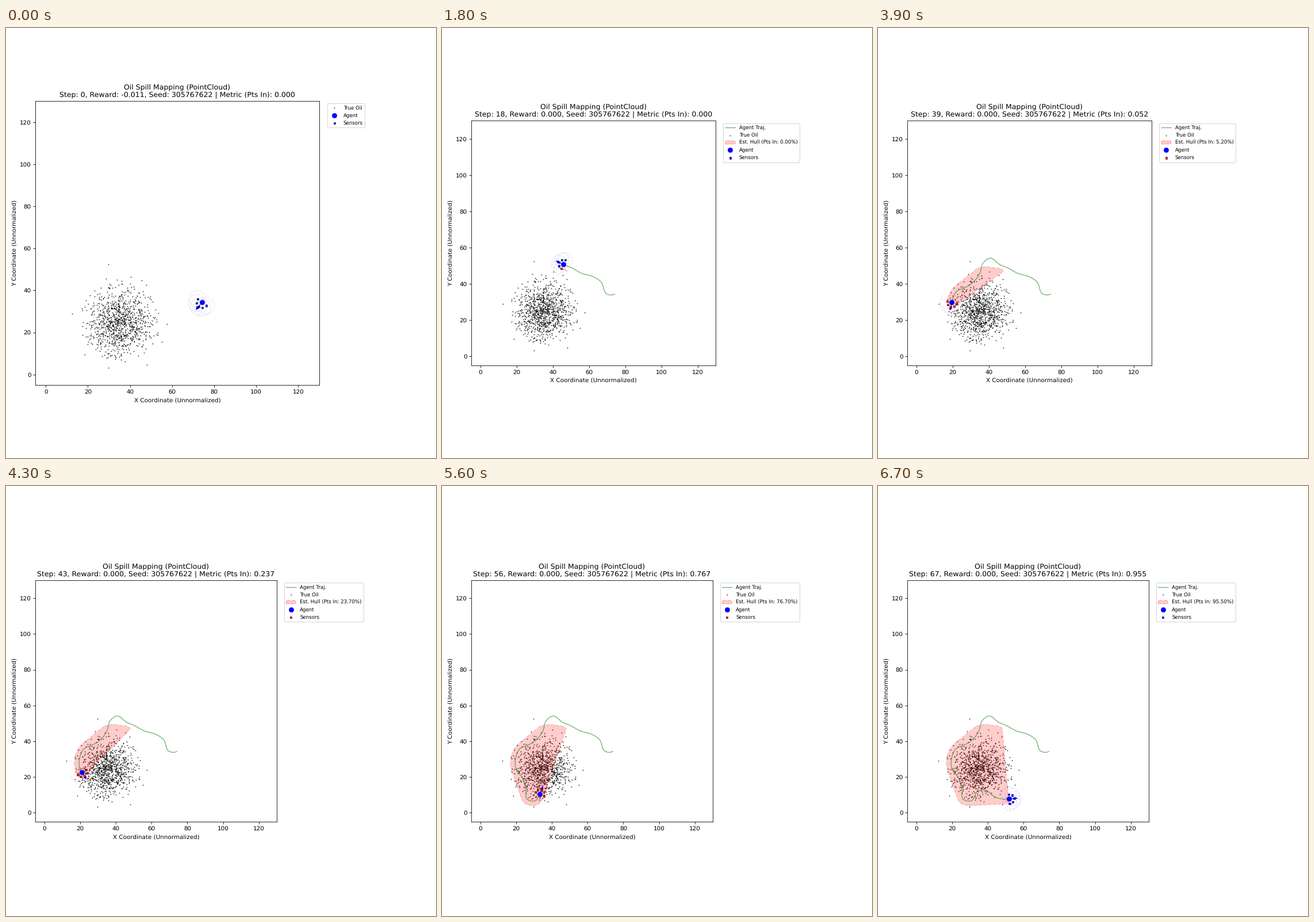
A matplotlib script for the animation above (6.8 s loop, 748x748 px).

```python
import numpy as np
import matplotlib.pyplot as plt
from matplotlib.animation import FuncAnimation

SIZE, STEPS, STRIDE = 748, 68, 3
REACH, SENSE = 2.6, 4.0     # sensor arm length, detection radius
SEED_LABEL = 305767622

# Waypoints the agent passes every STRIDE steps, from one stride before the start
WAYPOINTS = np.array([
    (78, 41), (74.2, 34.3), (69.1, 34.8), (67, 40.6), (62.1, 44), (56, 45.7),
    (50.8, 48.6), (45.8, 50.7), (41.1, 54.2), (36.6, 51.2), (35.1, 45.8),
    (31.6, 41), (27.1, 38), (22, 35.7), (19.6, 29.7), (20.1, 24.2),
    (23.4, 19.7), (25.5, 13.7), (25.9, 7.8), (31.1, 6.8), (34.3, 12.1),
    (39.4, 12.4), (43.9, 8.8), (50, 7.6), (56, 8.6)])

# Oil far outside the random cloud
STRAYS = np.array([
    (29.7, 52.5), (40.3, 46.5), (45.5, 44.8), (47.7, 42.6), (28.5, 45.5),
    (12.5, 29), (57.5, 24), (55, 15.6), (48, 4.6), (29.7, 3.3), (18.5, 9.5)])

plt.rcParams["text.hinting"] = "none"


def spline(points, t):
    """Catmull-Rom curve; whole values of t fall on the points."""
    ends = 2 * points[[0, -1]] - points[[1, -2]]
    p = np.vstack([ends[:1], points, ends[1:]])
    i = np.floor(t).astype(int)
    u = (t - i)[:, None]
    a, b, c, d = (p[i + j] for j in range(4))
    return b + u / 2 * (c - a + u * (2 * a - 5 * b + 4 * c - d
                                     + u * (3 * (b - c) + d - a)))


def make_oil(total=1000):
    z = np.random.default_rng(7).normal(size=(2 * total, 2))
    z = z[np.hypot(*z.T) < 2.5][:total - len(STRAYS)]
    return np.vstack([z * 7.8 + (35, 25.5), STRAYS])


def convex_hull(points):
    def half(seq):
        chain = []
        for x, y in seq:
            while len(chain) > 1:
                (x0, y0), (x1, y1) = chain[-2:]
                if (x1 - x0) * (y - y0) > (y1 - y0) * (x - x0):
                    break
                chain.pop()
            chain.append((x, y))
        return chain[:-1]

    pts = sorted(map(tuple, points))
    return np.array(half(pts) + half(pts[::-1]))


oil = make_oil()
track = spline(WAYPOINTS, 1 + np.arange(-1, STEPS) / STRIDE)
move = np.diff(track, axis=0)
track = track[1:]
heading = np.arctan2(move[:, 1], move[:, 0])

# Five sensors on a half circle ahead of the agent
angles = heading[:, None] + np.radians(np.linspace(-90, 90, 5))
sensors = track[:, None] + REACH * np.stack([np.cos(angles), np.sin(angles)], -1)
hits = np.linalg.norm(sensors[:, :, None] - oil, axis=-1).min(-1) < SENSE

metric = np.interp(np.arange(STEPS), [18, 31, 39, 49, 56, 67],
                   [0, .004, .052, .515, .767, .955]).round(3)

fig = plt.figure(figsize=(10, 10), dpi=SIZE / 10, facecolor="white")
ax = fig.add_subplot()


def axes_width(k, has_hull):
    """The plot shrinks as the legend grows wider."""
    if has_hull:
        return 425.3 if metric[k] < 0.1 else 420
    return 481 if k else 494


def draw(k):
    ax.clear()
    x, y = track[k]
    found = sensors[:k + 1][hits[:k + 1]]
    has_hull = len(found) >= 3
    side = axes_width(k, has_hull) / SIZE
    ax.set_position([51 / SIZE, 0.5 - side / 2, side, side])

    if k:
        ax.plot(*track[:k + 1].T, "g-", lw=1.2, alpha=0.6, label="Agent Traj.")
    ax.scatter(*oil.T, s=1, c="black", lw=0.8, alpha=0.7, label="True Oil")
    if has_hull:
        ax.fill(*convex_hull(found).T, fc="red", ec="red", alpha=0.2, ls="--",
                lw=1.5, label=f"Est. Hull (Pts In: {metric[k]:.2%})")
    ax.plot(x, y, "bo", ms=8, mew=0.5, ls="none", label="Agent")
    ax.arrow(x, y, 3 * np.cos(heading[k]), 3 * np.sin(heading[k]),
             head_width=1.5, head_length=1.5, color="blue", lw=0.6, zorder=2.5)

    colors = np.where(hits[k], "red", "blue")
    ax.scatter(*sensors[k].T, s=10, marker="s", c=colors, edgecolors="black",
               lw=0.5, zorder=3, label="Sensors")
    for center, color in zip(sensors[k], colors):
        ax.add_patch(plt.Circle(center, SENSE, fill=False, ec=color,
                                ls="--", lw=1, alpha=0.13))

    ax.set(xlim=(-5, 130), ylim=(-5, 130))
    ax.set_xlabel("X Coordinate (Unnormalized)", labelpad=4.6)
    ax.set_ylabel("Y Coordinate (Unnormalized)")
    reward = 0.0 if k else -0.011
    ax.set_title("Oil Spill Mapping (PointCloud)\n"
                 f"Step: {k}, Reward: {reward:.3f}, Seed: {SEED_LABEL} | "
                 f"Metric (Pts In): {metric[k]:.3f}", pad=6.6)
    ax.legend(loc="upper left", bbox_to_anchor=(1.02, 1), fontsize="small")
    return []


anim = FuncAnimation(fig, draw, frames=STEPS, interval=100, repeat=True,
                     repeat_delay=0)
plt.show()
```
